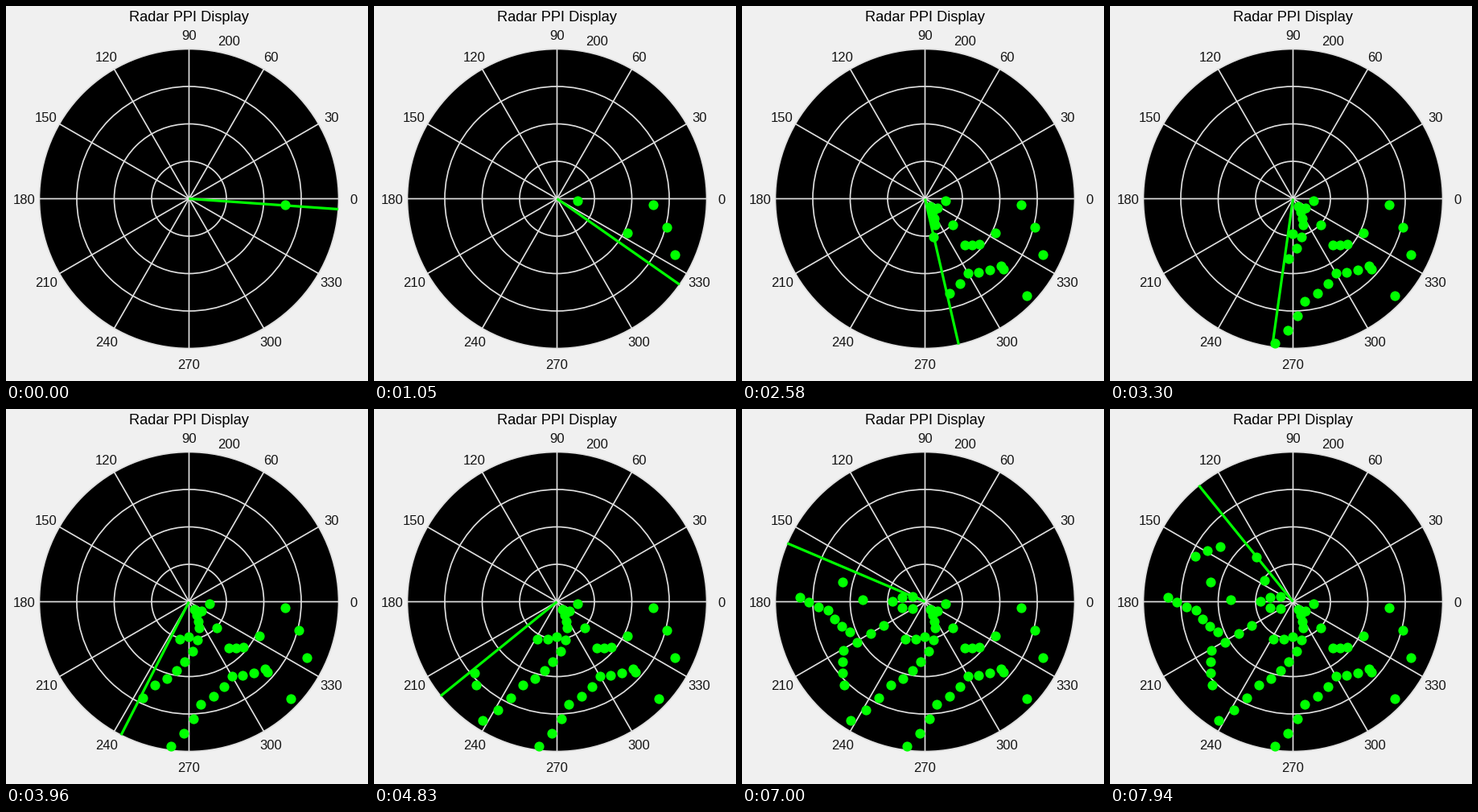
These frames come from a looping animation (450x466 px, 7.99 s). A matplotlib script:

```python
import numpy as np
import matplotlib.pyplot as plt
from matplotlib.animation import FuncAnimation
from matplotlib.collections import LineCollection
from matplotlib.patches import Circle

W, H, DPI = 450, 466, 64
PT = 72 / DPI                      # points per pixel
CX, CY, R = 227.5, 239.5, 186
FRAMES, INTERVAL = 470, 17
START = 4                          # first sweep angle, degrees clockwise
GREEN, GRID, INK = "#00ff00", "#dfdfdf", "#151515"

# The sweep turns one degree at a time; its pace drifts a little
PACE_MS = [0, 1050, 2580, 3960, 4830, 6040, 7940]
PACE_DEG = [0, 31, 73, 113, 137, 171, 227]

# Echo trails: dots per leg, then (clockwise bearing, distance) corners
TRAILS = [
    (2, [(3.8, 120), (25.3, 162)]),
    (1, [(6, 25.6), (26, 97)]),
    (2, [(36.7, 19), (49.5, 76), (40, 88), (43.7, 175)]),
    (3, [(41.5, 126), (60, 107), (83.3, 128), (97, 181)]),
    (3, [(55.4, 11.5), (69, 35), (94, 75), (112.2, 112), (122, 174)]),
    (2, [(90.4, 43.5), (118, 53)]),
    (3, [(134.3, 144), (149, 118), (150, 59)]),
    (3, [(158, 101), (175, 121), (182, 156)]),
    (2, [(151.3, 18), (180.6, 40.5), (203, 17), (230.8, 72)]),
    (2, [(182, 77.5), (205, 134), (217, 113.5)]),
]


def polar(deg, r):
    """Pixel position for a clockwise bearing, y pointing down."""
    a = np.radians(deg)
    return CX + r * np.cos(a), CY + r * np.sin(a)


def trail(per_leg, corners):
    """Evenly spaced echoes along the legs between the corners."""
    bearing, dist = np.transpose(corners)
    legs = len(corners) - 1
    u = np.linspace(0, legs, legs * per_leg + 1)
    k = np.arange(legs + 1)
    return np.array([np.interp(u, k, bearing), np.interp(u, k, dist)])


def label(x, y, text, size, color=INK):
    ax.text(x, y, text, size=size * PT, color=color, ha="center",
            va="baseline", family="Liberation Sans")


fig = plt.figure(figsize=(W / DPI, H / DPI), dpi=DPI, facecolor="#f0f0f0")
ax = fig.add_axes([0, 0, 1, 1])
ax.set_xlim(0, W)
ax.set_ylim(H, 0)
ax.axis("off")

ax.add_patch(Circle((CX, CY), R, fc="black", ec="none", zorder=0))
for k in range(1, 5):
    ax.add_patch(Circle((CX, CY), R * k / 4, fc="none", ec=GRID,
                        lw=1.7 * PT, zorder=1))
spokes = [(polar(d, R), polar(d + 180, R)) for d in range(0, 180, 30)]
ax.add_collection(LineCollection(spokes, colors=GRID, linewidths=1.7 * PT,
                                 snap=False, zorder=1))

for d in range(0, 360, 30):
    x, y = polar(-d, 204.6)
    label(x - 0.3, y + 6.8, str(d), 16.6)
label(276.7, 49, "200", 16.6)
label(CX - 0.3, 19.2, "Radar PPI Display", 18.3, "black")

sweep, = ax.plot([], [], color=GREEN, lw=3.2 * PT, zorder=3,
                 solid_capstyle="butt", snap=False)
dots, = ax.plot([], [], "o", color=GREEN, ms=12.2 * PT, mew=0, zorder=4,
                snap=False)

bearings, distances = np.hstack([trail(*t) for t in TRAILS])
dot_x, dot_y = polar(bearings, distances)


def update(i):
    t = (i + 1) * INTERVAL
    angle = START + int(np.interp(t, PACE_MS, PACE_DEG))
    x, y = polar(angle, R)
    sweep.set_data([CX, x], [CY, y])
    seen = np.round(bearings) <= angle
    dots.set_data(dot_x[seen], dot_y[seen])
    return sweep, dots


anim = FuncAnimation(fig, update, frames=FRAMES, interval=INTERVAL,
                     init_func=lambda: update(0), repeat=True,
                     repeat_delay=0, blit=False)
plt.show()
```
